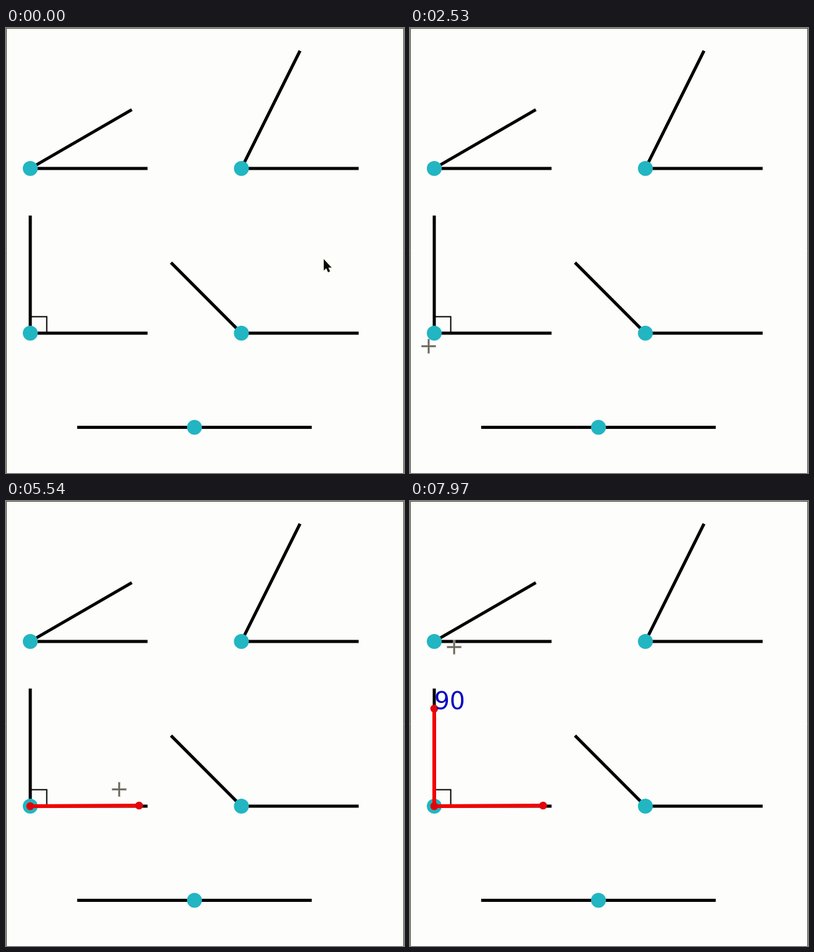
Animation of 640 by 716 pixels, one loop 8000 ms. Source, as an HTML page with a canvas:

```html
<!DOCTYPE html>
<html lang="en">
<head>
<meta charset="utf-8">
<title>Measuring angles</title>
<style>
  html, body { margin: 0; width: 100%; height: 100%; overflow: hidden; }
  canvas { display: block; }
</style>
</head>
<body>
<canvas id="stage" width="640" height="716"></canvas>
<script>
const ctx = document.getElementById("stage").getContext("2d");
const LOOP = 8000, CROSS_FROM = 1600, CURSOR_OFFSET = 19;
const TEAL = "#22b5c2", LINE_RED = "#f20202", DOT_RED = "#e2040c";

// The figures stand on a square grid: vertex, then the tip of the second arm.
const grid = (column, row) => [1.3 + 37.72 * column, 37.86 * row - 1.2];
const angles = [
  { at: [1, 6], arm: [5 * Math.cos(Math.PI / 6), 2.5] },
  { at: [10, 6], arm: [2.5, 5] },
  { at: [1, 13], arm: [0, 5], square: true },
  { at: [10, 13], arm: [-3, 3] },
  { at: [8, 17], arm: [-5, 0] }
];

const clicks = [
  { time: 3000, point: [39, 491] },
  { time: 4850, point: [214, 490] },
  { time: 6550, point: [39, 334] }
];
const [vertex, right, top90] = clicks.map(click => click.point);
const over = point => point.map(value => value + CURSOR_OFFSET);

// The pointer rests between moves; lift bows the path upwards.
const cursorStart = [511, 372];
const moves = [
  { start: 240, end: 2400, to: [20, 513], lift: 70 },
  { start: 2400, end: 2787, to: over(vertex) },
  { start: 3250, end: 4028, to: [235, 509] },
  { start: 4650, end: 4800, to: over(right) },
  { start: 5150, end: 6250, to: over(top90) },
  { start: 6950, end: 7970, to: [71, 235] }
];

function path(points, color, width) {
  ctx.beginPath();
  points.forEach(point => ctx.lineTo(...point));
  ctx.strokeStyle = color;
  ctx.lineWidth = width;
  ctx.stroke();
}

function dot([x, y], radius, color) {
  ctx.beginPath();
  ctx.arc(x, y, radius, 0, 2 * Math.PI);
  ctx.fillStyle = color;
  ctx.fill();
}

function drawAngle({ at: [column, row], arm: [dx, dy], square }) {
  const center = grid(column, row);
  path([grid(column + 5, row), center, grid(column + dx, row - dy)], "#000", 5);
  if (square) {
    const [x, y] = center, side = 26.5;
    path([[x, y - side], [x + side, y - side], [x + side, y]], "#000", 2);
  }
  dot(center, 12, TEAL);
}

function drawMeasure(time) {
  const done = clicks.filter(click => time >= click.time).map(click => click.point);
  done.slice(1).forEach(point => path([vertex, point], LINE_RED, 6));
  done.forEach(point => dot(point, 6.3, DOT_RED));
  if (done.length === clicks.length) {
    ctx.font = '39px "DejaVu Sans", sans-serif';
    ctx.fillStyle = "#0808c4";
    ctx.fillText("90", top90[0], top90[1] + 1);
  }
}

function cursorAt(time) {
  let [x, y] = cursorStart;
  for (const { start, end, to, lift = 0 } of moves) {
    const s = Math.min(1, Math.max(0, (time - start) / (end - start)));
    const p = s * s * (3 - 2 * s);
    x += (to[0] - x) * p;
    y += (to[1] - y) * p - lift * Math.sin(Math.PI * p);
    if (s < 1) break;
  }
  return [Math.round(x), Math.round(y)];
}

function drawCross() {
  for (const [length, color, width] of [[12, "#b4b2a8", 4], [11, "#5f5d58", 1.8]]) {
    path([[-length, 0], [length, 0]], color, width);
    path([[0, -length], [0, length]], color, width);
  }
}

function drawArrow() {
  const shape = new Path2D("M0 0V18L4 14.5L7 21L10 19.5L7.3 13.5H12.5Z");
  ctx.strokeStyle = "#e8e6d0";
  ctx.lineWidth = 1.5;
  ctx.stroke(shape);
  ctx.fillStyle = "#080808";
  ctx.fill(shape);
}

function draw(time) {
  ctx.fillStyle = "#fdfdfb";
  ctx.fillRect(0, 0, 640, 716);
  path([[0.5, 716], [0.5, 0.5], [639.5, 0.5], [639.5, 716]], "#3a3820", 1);
  angles.forEach(drawAngle);
  drawMeasure(time);
  ctx.save();
  ctx.translate(...cursorAt(time));
  time < CROSS_FROM ? drawArrow() : drawCross();
  ctx.restore();
}

const begin = performance.now();
function tick() {
  draw((performance.now() - begin) % LOOP);
  requestAnimationFrame(tick);
}
tick();
</script>
</body>
</html>
```
